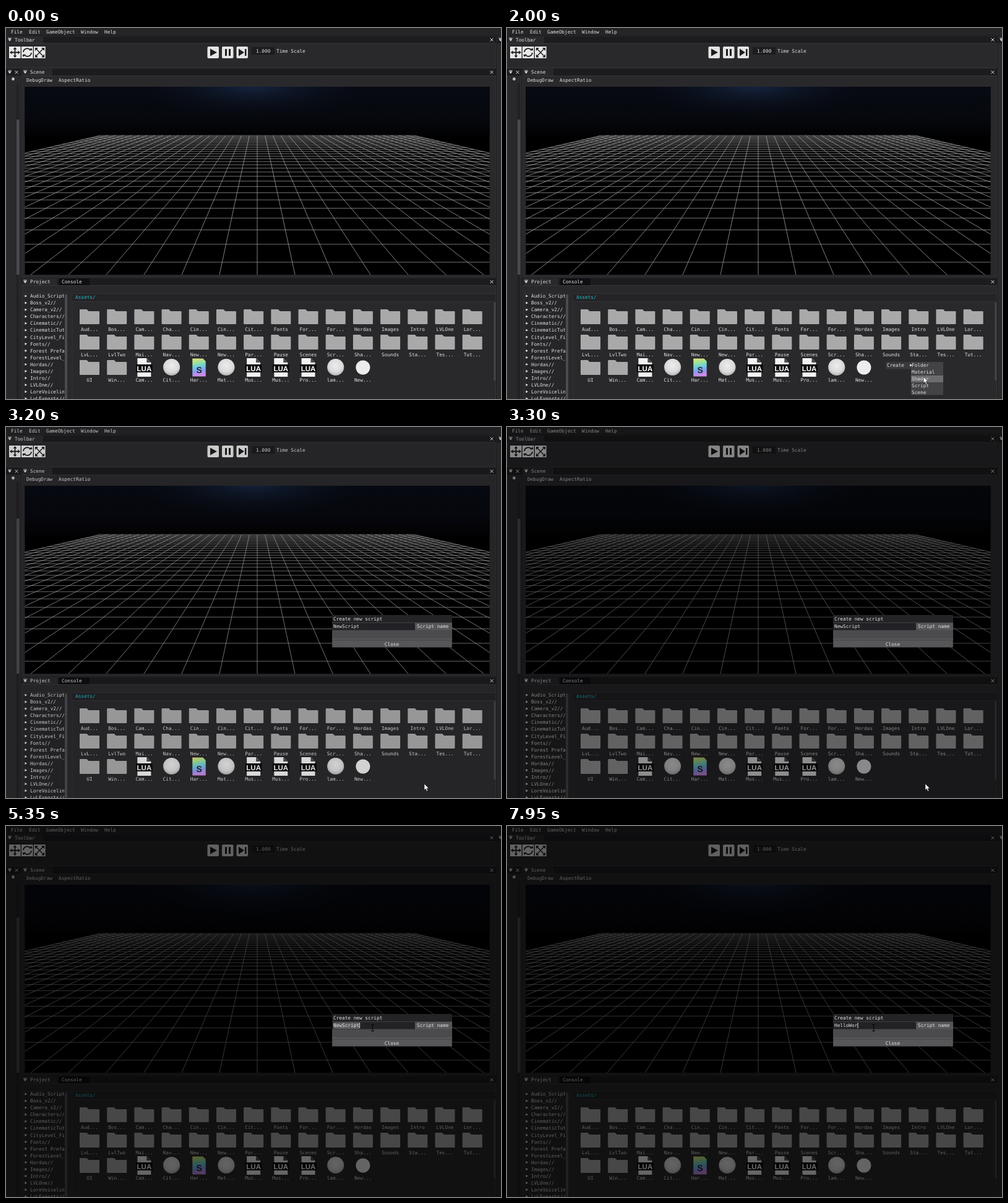
Animation of 800x600 px, one loop 8000 ms. Source, as an HTML page:

```html
<!DOCTYPE html>
<html lang="en">
<head>
<meta charset="utf-8">
<title>Editor: create script</title>
<style>
html, body { margin: 0; width: 100%; height: 100%; overflow: hidden; background: #1b1a1d; }
svg { display: block; width: 800px; height: 600px; }
text { font: 7.75px "DejaVu Sans Mono", monospace; fill: #e2e2e2; text-rendering: geometricPrecision; white-space: pre; }
text.tag { font: bold 11.5px "Liberation Sans", sans-serif; fill: #fff; }
text.ess { font: bold 14px "Liberation Sans", sans-serif; fill: #1c2430; }
</style>
</head>
<body>
<svg id="stage" viewBox="0 0 800 600"></svg>
<script>
const LOOP = 8000, STEP = 50;
const CHAR = 4.667;
const PANEL = '#29282b', STRIP = '#1c1b1e', EDGE = '#3a393d';

const rect = (x, y, w, h, fill, more = '') =>
  `<rect x="${x}" y="${y}" width="${w}" height="${h}" fill="${fill}" ${more}/>`;
const path = (d, more) => `<path d="${d}" ${more}/>`;
const text = (x, midY, s, more = '') => `<text x="${x}" y="${midY + 2.7}" ${more}>${s}</text>`;
const group = (id, body, more = '') => `<g id="${id}" ${more}>${body}</g>`;
const down = (x, y) => path(`M${x - 2.8} ${y - 3}h5.6v1h-5.6zM${x - 2.6} ${y - 1.2}h5.2l-2.6 3.7z`, 'fill="#e4e4e4"');
const right = (x, y) => path(`M${x - 1.5} ${y - 2.1}l3.6 2.1l-3.6 2.1z`, 'fill="#e4e4e4"');
const cross = (x, y) => path(`M${x - 2.5} ${y - 2.5}l5 5m0 -5l-5 5`, 'stroke="#e0e0e0" stroke-width="1"');

function frame(x, y, w, h, tabW, title) {
  const mid = y + 5.5;
  return rect(x, y, w, h, PANEL, `stroke="${EDGE}" stroke-width=".8"`) +
    rect(x, y, w, 11, STRIP) + rect(x + 1, y, tabW, 11.5, PANEL) +
    rect(x, y + 11, w, .8, EDGE) + down(x + 6, mid) + text(x + 14, mid, title);
}

function toolbar() {
  const ink = 'fill="none" stroke="#1d1d1f" stroke-width="1.8"';
  const solid = 'fill="#1d1d1f"';
  let s = frame(0, 13.5, 792, 51, 59, 'Toolbar') + cross(785, 19);
  s += [5, 25, 45].map(x => rect(x, 30, 18.6, 19, '#e9e9e9')).join('');
  s += path('M8 39.5h13M14.5 33v13', ink);
  s += path('M14.5 31l3 3.6h-6zM14.5 48l3-3.6h-6zM6 39.5l3.6-3v6zM23 39.5l-3.6-3v6z', solid);
  s += path('M28 39a6.4 6.4 0 0 1 11.5-3.2M41 40a6.4 6.4 0 0 1-11.5 3.2', ink);
  s += path('M42.5 36l-5.4.6 4-4.6zM26.5 43l5.4-.6-4 4.6z', solid);
  s += path('M49 34l10.5 11M59.5 34l-10.5 11', ink.replace('1.8', '1.4'));
  s += path('M47 32h5l-5 5zM62 32h-5l5 5zM47 47.5h5l-5-5zM62 47.5h-5l5-5z', solid);
  s += [325.5, 349, 372.5].map(x => rect(x, 30, 18.5, 19, '#e4e4e4', 'rx="2"')).join('');
  s += path('M330 33.5l11 6-11 6zM354 34h3v11h-3zM360 34h3v11h-3zM376 33.5l9 6-9 6zM386 34h2.5v11h-2.5z', solid);
  return s + rect(397, 31, 37, 12, '#1c1b1e') + text(404, 37, '1.000') + text(437, 37, 'Time Scale');
}

function grid() {
  const cx = 406, horizon = 114.8, far = 174, near = 400, half = 20;
  const spread = y => .2147 * (y - horizon);
  let d = '', rows = '';
  for (let i = -half; i <= half; i++)
    d += `M${cx + i * spread(far)} ${far}L${cx + i * spread(near)} ${near}`;
  for (let n = 0; n <= 28; n++) {
    const y = horizon + 1 / (.003788 + n * .000468), w = half * spread(y);
    rows += `M${cx - w} ${y}H${cx + w}`;
  }
  return path(d, 'stroke="#b8b8b8" stroke-width=".7"') + path(rows, 'stroke="#a4a4a4" stroke-width=".7"');
}

function scene() {
  return frame(25, 66, 767, 337, 49, 'Scene') + cross(785, 71.5) +
    text(33, 84, 'DebugDraw') + text(85, 84, 'AspectRatio') +
    rect(30.5, 95, 751, 304, '#000') + rect(30.5, 95, 751, 80, 'url(#sky)') +
    `<g clip-path="url(#view)"><ellipse cx="398" cy="92" rx="190" ry="55" fill="url(#glow)"/>${grid()}</g>`;
}

function sidePanels() {
  return rect(0, 66, 23, 534, PANEL, `stroke="${EDGE}" stroke-width=".8"`) + rect(0, 66, 23, 11, STRIP) +
    down(6, 71.5) + cross(17, 71.5) + '<circle cx="11.5" cy="82.5" r="2.4" fill="#c4c4c4"/>' +
    rect(16.5, 90, 5, 510, '#222124') + rect(17, 148, 4.5, 251, '#4b4a4e', 'rx="1"') +
    rect(794, 13.5, 8, 590, PANEL, `stroke="${EDGE}" stroke-width=".8"`) + rect(794, 14, 6, 11, STRIP) + down(799, 19);
}

const folder = (x, y) =>
  path(`M${x - 16} ${y - 11}q0-1 1-1h10.5l3 3h16.5q1 0 1 1v19q0 1-1 1h-30q-1 0-1-1z`, 'fill="#aaa9aa"');
const lua = (x, y) =>
  path(`M${x - 11} ${y - 15}h15l7 7v23h-22z`, 'fill="#f2f2f2"') +
  path(`M${x + 4} ${y - 15}v7h7z`, 'fill="#4a4a4c"') +
  rect(x - 13.5, y - 5, 27, 13, '#0d0d0e') +
  `<text class="tag" text-anchor="middle" x="${x}" y="${y + 5.5}">LUA</text>`;
const ball = (x, y) => `<circle cx="${x}" cy="${y - .5}" r="13.6" fill="url(#ball)"/>`;
const shader = (x, y) =>
  path(`M${x - 10.5} ${y - 14.5}h17l4.5 4.5v24.5h-21.5z`, 'fill="url(#rainbow)"') +
  `<text class="ess" text-anchor="middle" x="${x + .5}" y="${y + 8.5}">S</text>`;
const badge = (x, y) => `<circle cx="${x}" cy="${y}" r="11.5" fill="#ececec"/>`;

const ASSETS = [
  'Aud... Bos... Cam... Cha... Cin... Cin... Cit... Fonts For... For... Hordas Images Intro LVLOne Lor...',
  'LvL... LvlTwo Mai... Nav... New... New... Par... Pause Scenes Scr... Sha... Sounds Sta... Tes... Tut...',
  'UI Win... Cam... Cit... Har... Mat... Mus... Mus... Pro... lam... New...'
];
const LAST_ROW = [folder, folder, lua, ball, shader, ball, lua, lua, lua, ball, badge];
const TREE = ['Audio_Script', 'Boss_v2//', 'Camera_v2//', 'Characters//', 'Cinematic//', 'CinematicTut',
  'CityLevel_Fi', 'Fonts//', 'Forest Prefa', 'ForestLevel_', 'Hordas//', 'Images//', 'Intro//', 'LVLOne//',
  'LoreVoicelin', 'LvLExports//'];

function project() {
  let s = frame(25, 405, 767, 200, 57, 'Project') + cross(785, 410.5) +
    rect(86, 405, 49, 11, '#0f0e11') + text(90, 410.5, 'Console');
  s += rect(28, 429.5, 72, 175, '#262528', `stroke="${EDGE}" stroke-width=".6"`);
  s += TREE.map((name, i) => right(32, 433.5 + 11.05 * i) + text(39, 433.5 + 11.05 * i, name)).join('');
  s += rect(94.5, 430, 5, 170, '#222124') + rect(95, 431, 4, 169, '#4b4a4e');
  s += rect(107, 429.5, 684, 175, PANEL, `stroke="${EDGE}" stroke-width=".6"`);
  s += rect(107, 430, 684, 12, '#242326') + rect(107, 442, 684, .8, EDGE);
  s += text(112, 435.5, 'Assets/', 'style="fill:#1fc3cf"') + rect(788.5, 444, 2.5, 126, '#47464a');
  ASSETS.forEach((line, row) => line.split(' ').forEach((name, col) => {
    const x = 135 + 44.19 * col, y = 467 + 41 * row;
    s += (row === 2 ? LAST_ROW[col] : folder)(x, y) +
      text(x, y + 20, name, 'text-anchor="middle"');
  }));
  return s;
}

function menus() {
  const items = ['Folder', 'Material', 'Shader', 'Script', 'Scene'];
  const main = rect(612, 540, 41, 11.5, '#39383c') + text(614, 545.5, 'Create') + right(653, 545.5);
  const sub = rect(653, 540, 52, 53.5, '#434245') + rect(653, 540, 52, 11, '#6c6b6e', 'id="hover"') +
    right(653, 545.5) + items.map((s, i) => text(654, 545.5 + 11 * i, s)).join('');
  return group('menu', main) + group('submenu', sub);
}

function dialog() {
  return rect(527, 304, 194, 52.5, '#4b4a4d', 'rx="1"') + rect(527, 304, 194, 12.3, '#242326') +
    rect(527, 317, 134, 11.5, '#222125') + rect(661, 317, 60, 11.5, '#565558') +
    rect(527, 342.5, 194, .8, '#6a696c') + rect(528, 345.5, 192, 10.5, '#575659') +
    text(529, 310, 'Create new script') + text(664, 322.5, 'Script name') +
    text(623.5, 351, 'Close', 'text-anchor="middle"') +
    rect(529, 317.5, 9 * CHAR, 10.5, 'rgba(186,186,186,.4)', 'id="selection"') +
    text(529, 322.5, '', 'id="field"') + rect(0, 318, .9, 9, '#f0f0f0', 'id="caret"');
}

const stop = (offset, color, alpha = 1) =>
  `<stop offset="${offset}" stop-color="${color}" stop-opacity="${alpha}"/>`;
const defs = `<defs>
  <linearGradient id="sky" x2="0" y2="1">${stop(0, '#070a12')}${stop(.6, '#06080e')}${stop(1, '#020203')}</linearGradient>
  <radialGradient id="glow">${stop(0, '#1b2f50', .75)}${stop(.3, '#14223b', .6)}${stop(1, '#0a0e19', 0)}</radialGradient>
  <radialGradient id="ball" cx=".5" cy=".4" r=".62">${stop(0, '#ededed')}${stop(.65, '#dadada')}${stop(1, '#aeaeae')}</radialGradient>
  <linearGradient id="rainbow" x2=".15" y2="1">${stop(0, '#ece07c')}${stop(.25, '#a5e391')}${stop(.5, '#6ccfdc')}${stop(.75, '#8d9cf0')}${stop(1, '#cf8be6')}</linearGradient>
  <clipPath id="view">${rect(30.5, 95, 751, 304, '#000')}</clipPath>
</defs>`;

const MENU = [[8, 'File'], [37, 'Edit'], [65, 'GameObject'], [121, 'Window'], [159, 'Help']];
document.getElementById('stage').innerHTML = defs + rect(0, 0, 800, 600, '#151417') +
  rect(0, 0, 800, 12.5, '#252427') + MENU.map(([x, s]) => text(x, 6.5, s)).join('') +
  toolbar() + sidePanels() + scene() + project() + menus() +
  rect(0, 0, 800, 600, '#000', 'id="dim"') + group('dialog', dialog()) +
  group('arrow', path('M0 0v10.2l2.3-2.1 1.7 3.9 1.8-.8-1.7-3.8h3.2z', 'fill="#fff" stroke="#111" stroke-width=".6"')) +
  group('beam', path('M-2.5-5h5M0-5v10M-2.5 5h5', 'stroke="#060606" stroke-width="1.1" fill="none"'));

const el = id => document.getElementById(id);
const show = (id, on) => el(id).setAttribute('visibility', on ? 'visible' : 'hidden');
const clamp = v => Math.min(1, Math.max(0, v));

// time, x, y of the pointer
const POINTER = [
  [50, 770, 6], [300, 720, 260], [650, 614, 551], [850, 612, 541], [1050, 612, 541], [1250, 632, 545],
  [1450, 656, 547], [1700, 667, 555], [2000, 673, 564], [2400, 676, 576], [2600, 676, 577],
  [3450, 676, 577], [3900, 604, 303], [4250, 591, 327], [4400, 591, 327], [4600, 592.5, 326.5]
];
const TYPING = [[0, 'NewScript'], [5750, 'H'], [5950, 'He'], [6150, 'Hel'], [6350, 'Hell'],
  [6650, 'Hello'], [6950, 'HelloW'], [7350, 'HelloWo'], [7750, 'HelloWor']];
const OPEN = 3160, SELECT = 4800;

function pointerAt(t) {
  const next = POINTER.findIndex(p => p[0] > t);
  if (next < 1) return POINTER[next ? POINTER.length - 1 : 0].slice(1);
  const [a, b] = [POINTER[next - 1], POINTER[next]];
  const u = (t - a[0]) / (b[0] - a[0]), k = u * u * (3 - 2 * u);
  return [a[1] + (b[1] - a[1]) * k, a[2] + (b[2] - a[2]) * k];
}

function draw(t) {
  const [x, y] = pointerAt(t);
  const beam = t >= 4100;
  show('arrow', t >= 50 && !beam);
  show('beam', beam);
  el(beam ? 'beam' : 'arrow').setAttribute('transform', `translate(${x} ${y})`);

  show('menu', t >= 1000 && t < OPEN);
  show('submenu', t >= 1300 && t < OPEN);
  const row = Math.min(4, Math.floor((y - 540) / 11));
  el('hover').setAttribute('y', 540 + 11 * row);
  show('hover', t >= 1300 && t < OPEN && x >= 653);

  el('dim').setAttribute('opacity', .575 * clamp((t - 3165) / 185));
  show('dialog', t >= OPEN);
  const typed = TYPING.filter(k => k[0] <= t).pop()[1];
  const typing = t >= TYPING[1][0];
  el('field').textContent = typed;
  el('caret').setAttribute('x', 529 + typed.length * CHAR + .2);
  show('caret', typing || (t >= SELECT && (t - SELECT) % 1200 < 800));
  show('selection', t >= SELECT && !typing);
}

const start = performance.now();
function tick() {
  const t = (performance.now() - start) % LOOP;
  draw(Math.floor(t / STEP) * STEP);
  requestAnimationFrame(tick);
}
tick();
</script>
</body>
</html>
```
